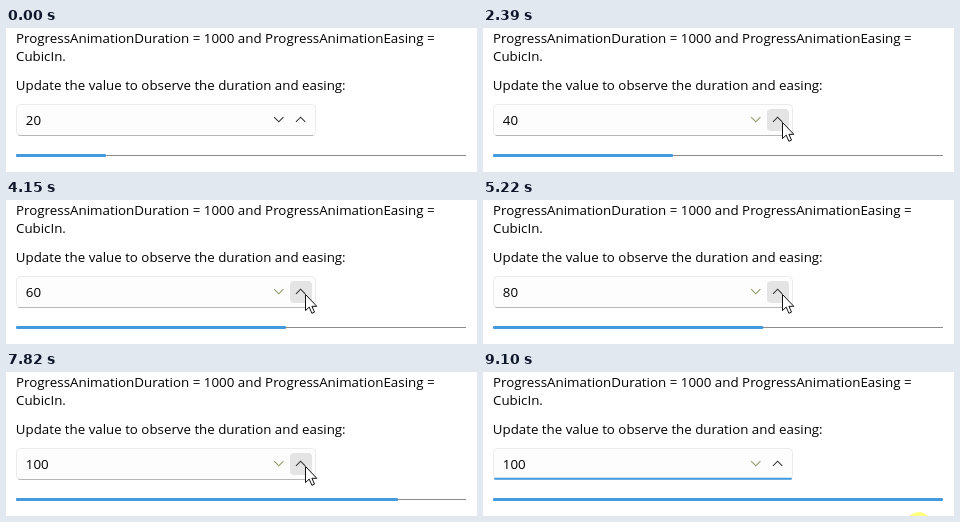
These frames come from a looping animation (471x144 px, 9170 ms). An HTML page:

```html
<!DOCTYPE html>
<html lang="en">
<head>
<meta charset="utf-8">
<title>Progress easing</title>
<style>
  html, body { margin: 0; width: 100%; height: 100%; overflow: hidden; background: #fff; }
  svg { display: block; }
  text { font: 13.32px "Open Sans", "Noto Sans", sans-serif; fill: #000; }
  .wide { font-size: 13.37px; }
  .chevron { fill: none; stroke: #333; stroke-width: 1.1; }
</style>
</head>
<body>
<svg width="471" height="144" viewBox="0 0 471 144">
  <text class="wide" x="10" y="15">ProgressAnimationDuration = 1000 and ProgressAnimationEasing =</text>
  <text x="10" y="33">CubicIn.</text>
  <text x="9.8" y="62">Update the value to observe the duration and easing:</text>

  <rect x="10.5" y="76.5" width="299" height="31" rx="4" fill="#fdfdfd" stroke="#ebebeb"/>
  <path id="underline" fill="none" stroke-linecap="round"/>
  <text id="value" x="19.8" y="97"></text>
  <path id="down" class="chevron" d="M268.2 89.2l4.6 4.6 4.6-4.6"/>
  <rect id="button" x="284" y="81" width="22" height="22" rx="4"/>
  <path id="up" class="chevron" d="M290 93.8l4.6-4.6 4.6 4.6"/>

  <rect x="10" y="127" width="450" height="1" fill="#8c8c8c"/>
  <rect id="bar" x="10" y="126" height="3" rx="1" fill="#459ade"/>

  <path id="cursor" d="M.5 .5V16.6l3.7-3.5 2.7 6.2 2.6-1.2-2.6-5.8h4.9z"
        fill="#fff" stroke="#111" stroke-linejoin="round"/>
  <circle id="halo" cx="436" cy="152" r="12" fill="#ffff80"/>
</svg>
<script>
const LOOP = 9170, STEP = 20, DURATION = 1000;
const starts = [1353, 3114, 5080, 7195];   // when each new value is set
const presses = [1220, 2920, 4880, 6990];  // when the button goes down
const LEAVE = 8400;

// Pointer tip: time, x, y
const path = [
  [190, 259, 136], [400, 285, 115], [600, 285, 115], [950, 298, 96],
  [1220, 298, 96], [1350, 299, 94], [8330, 299, 94],
  [8580, 372, 116], [8840, 438, 146]
];

const $ = id => document.getElementById(id);
const clamp = x => Math.max(0, Math.min(1, x));
const set = (id, attrs) => {
  for (const key in attrs) $(id).setAttribute(key, attrs[key]);
};

function pointer(t) {
  const i = path.findIndex(p => p[0] > t);
  if (i < 1) return null;
  const [t0, x0, y0] = path[i - 1], [t1, x1, y1] = path[i];
  const k = (t - t0) / (t1 - t0), e = k * (2 - k);
  return [x0 + (x1 - x0) * e, y0 + (y1 - y0) * e];
}

function draw(t) {
  let value = 20, progress = 20;
  for (const start of starts) {
    if (t >= start) value += STEP;
    progress += STEP * clamp((t - start) / DURATION) ** 3;
  }
  $('value').textContent = value;
  set('bar', { width: 4.5 * progress });

  const pressed = presses.some((p, i) => t >= p && t < starts[i]);
  const hover = clamp((t - 800) / 150) * clamp((LEAVE + 80 - t) / 80);
  set('button', { fill: pressed ? '#f0f0f0' : '#e4e4e4', opacity: hover });
  $('up').style.stroke = pressed ? '#777' : '#333';
  $('down').style.stroke = t < starts[0] ? '#333' : '#8b9d68';

  const focused = t >= LEAVE;
  set('underline', {
    d: focused ? 'M12 106.8H308' : 'M13 107.5H307',
    stroke: focused ? '#459ade' : '#b8b8b8',
    'stroke-width': focused ? 2 : 1
  });

  const tip = pointer(t);
  set('cursor', {
    visibility: tip ? 'visible' : 'hidden',
    transform: `translate(${tip || [0, 0]})`
  });
  set('halo', { visibility: t >= 9100 ? 'visible' : 'hidden' });
}

const begin = performance.now();
function tick(now) {
  draw(Math.max(0, now - begin) % LOOP);
  requestAnimationFrame(tick);
}
draw(0);
requestAnimationFrame(tick);
</script>
</body>
</html>
```
